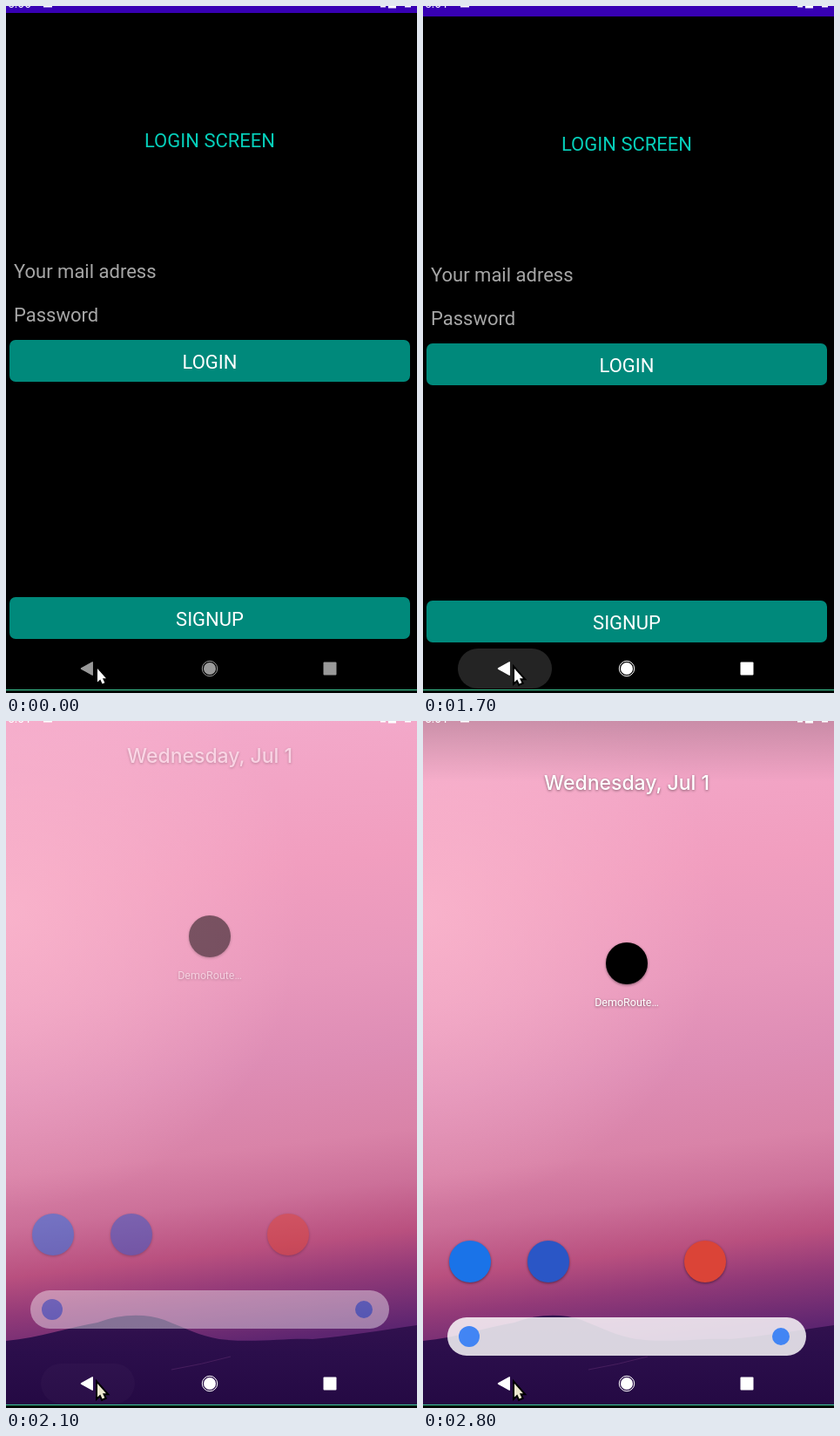
An HTML page that plays this animation: 472x788 px, repeating every 2900 ms.

```html
<!DOCTYPE html>
<html lang="en">
<head>
<meta charset="utf-8">
<title>Closing a login screen</title>
<style>
  html, body { margin: 0; width: 100%; height: 100%; overflow: hidden; background: #000; }
  svg { display: block; width: 472px; height: 788px; }
  text { font-family: Roboto, sans-serif; font-size: 22px; }
  .mid { text-anchor: middle; }
  .date { font: 500 23px Inter, sans-serif; }
  .label { font-size: 12.5px; }
  .status { font-size: 14px; }
  .shadow { filter: drop-shadow(0 1px 1.5px rgba(0, 0, 0, .45)); }
</style>
</head>
<body>
<svg viewBox="0 0 472 788">
  <defs>
    <linearGradient id="sky" gradientUnits="userSpaceOnUse" x1="190" y1="0" x2="275" y2="715">
      <stop offset="0" stop-color="#f3aacb"/>
      <stop offset=".25" stop-color="#f19ebf"/>
      <stop offset=".42" stop-color="#e898bc"/>
      <stop offset=".56" stop-color="#de8db5"/>
      <stop offset=".69" stop-color="#d983a8"/>
      <stop offset=".77" stop-color="#cc7099"/>
      <stop offset=".85" stop-color="#b9507f"/>
      <stop offset=".91" stop-color="#933a78"/>
      <stop offset="1" stop-color="#5d2570"/>
    </linearGradient>
    <radialGradient id="glow" gradientUnits="userSpaceOnUse" cx="0" cy="220" r="340">
      <stop offset="0" stop-color="#fab6cd" stop-opacity=".85"/>
      <stop offset="1" stop-color="#fab6cd" stop-opacity="0"/>
    </radialGradient>
    <linearGradient id="ground" x1="0" y1="0" x2="0" y2="1">
      <stop offset="0" stop-color="#33124f"/>
      <stop offset=".4" stop-color="#2b0e4b"/>
      <stop offset="1" stop-color="#240943"/>
    </linearGradient>
    <linearGradient id="shade" x1="0" y1="0" x2="0" y2="1">
      <stop offset="0" stop-opacity=".17"/>
      <stop offset="1" stop-opacity="0"/>
    </linearGradient>
  </defs>

  <g id="wallpaper">
    <rect width="472" height="788" fill="url(#sky)"/>
    <rect width="472" height="788" fill="url(#glow)"/>
    <path fill="url(#ground)" d="M0 711C40 707 70 696 105 690C130 680 160 679 182 687C207 697 222 705 245 709C285 714 325 707 352 709C395 705 430 699 472 693V788H0Z"/>
    <path d="M190 744Q225 738 258 729" fill="none" stroke="#5a2a6c" stroke-width="1" opacity=".6"/>
  </g>

  <g id="home">
    <rect id="topShade" width="472" height="70" fill="url(#shade)"/>
    <g id="homeItems">
      <text class="date mid shadow" x="234" y="79" fill="#fff">Wednesday, Jul 1</text>
      <g class="shadow">
        <circle cx="234" cy="278" r="24"/>
        <circle cx="54" cy="620" r="24" fill="#1a73e8"/>
        <circle cx="144" cy="620" r="24" fill="#2a56c6"/>
        <circle cx="324" cy="620" r="24" fill="#db4437"/>
      </g>
      <text class="label mid shadow" x="234" y="327" fill="#fff">DemoRoute…</text>
      <rect x="28" y="684" width="412" height="44" rx="22" fill="#fff" fill-opacity=".82"/>
      <circle cx="53" cy="706" r="12" fill="#4285f4"/>
      <circle cx="411" cy="706" r="10" fill="#4285f4"/>
    </g>
  </g>

  <g id="app">
    <rect y="-16" width="472" height="820"/>
    <rect y="-16" width="472" height="24" fill="#3700b3"/>
    <text class="mid" x="234" y="162" fill="#06cfba">LOGIN SCREEN</text>
    <g fill="#a6a6a6">
      <text x="9" y="312">Your mail adress</text>
      <text x="9" y="362">Password</text>
    </g>
    <g fill="#00897b">
      <rect x="4" y="383" width="460" height="48" rx="7"/>
      <rect x="4" y="678" width="460" height="48" rx="7"/>
    </g>
    <g class="mid" fill="#fff">
      <text x="234" y="416">LOGIN</text>
      <text x="234" y="711">SIGNUP</text>
    </g>
  </g>

  <g fill="#fff">
    <text id="clock" class="status" x="2" y="2">5:00</text>
    <path d="M43 0h10v1.5h-10zM430 0h6v1.5h-6zM439 0h9v2.5h-9zM458 0h7v1.5h-7z"/>
  </g>

  <rect id="ripple" x="40" y="737" width="108" height="46" rx="23" fill="#fff"/>
  <g id="nav">
    <path d="M86.5 760L99.2 752.8V767.2Z" stroke-width="1.5" stroke-linejoin="round"/>
    <circle cx="234" cy="760" r="7" stroke="none"/>
    <circle cx="234" cy="760" r="8.7" fill="none" stroke-width="1"/>
    <rect x="364.5" y="752.5" width="15" height="15" rx="1" stroke="none"/>
  </g>

  <rect y="785" width="472" height="3"/>
  <rect y="784" width="472" height="1" fill="#3fd39c"/>
  <path id="cursor" d="M105 760V775.5L108.3 772.5L110.6 777.5L113.4 776.2L111 771.3H115Z" stroke="#000" stroke-width="4" paint-order="stroke"/>
</svg>

<script>
  const LOOP = 2900, STEP = 100;
  const el = id => document.getElementById(id);
  const set = (id, attrs) => {
    for (const name in attrs) el(id).setAttribute(name, attrs[name]);
  };

  // Each track is a list of [time, value] points joined by straight lines.
  const tracks = {
    appY: [[1600, 0], [1700, 4], [1800, 103], [1900, 150]],
    appAlpha: [[1700, 1], [1800, .26], [1900, 0]],
    homeY: [[1800, -39.5], [2100, -31], [2200, -21], [2300, -9], [2400, -2], [2500, 0]],
    homeAlpha: [[1800, .34], [2100, .5], [2200, .67], [2300, .86], [2400, 1]],
    shadeAlpha: [[2500, 0], [2800, 1]],
    navLight: [[1100, 153], [1500, 255]],
    rippleAlpha: [[1200, 0], [1400, .14], [1700, .14], [1800, .035], [2100, .025], [2400, 0]],
    rippleSize: [[1200, .5], [1500, 1]]
  };

  function at(track, t) {
    const points = tracks[track];
    const next = points.findIndex(p => p[0] > t);
    if (next === 0) return points[0][1];
    if (next < 0) return points[points.length - 1][1];
    const [t0, v0] = points[next - 1], [t1, v1] = points[next];
    return v0 + (v1 - v0) * (t - t0) / (t1 - t0);
  }

  function draw(t) {
    set('app', { transform: `translate(0 ${at('appY', t)})`, opacity: at('appAlpha', t) });
    set('homeItems', { transform: `translate(0 ${at('homeY', t)})`, opacity: at('homeAlpha', t) });
    set('topShade', { opacity: at('shadeAlpha', t) });

    const light = Math.round(at('navLight', t));
    const shade = `rgb(${light},${light},${light})`;
    set('nav', { fill: shade, stroke: shade });

    const size = at('rippleSize', t);
    set('ripple', {
      opacity: at('rippleAlpha', t),
      transform: `translate(94 760) scale(${size}) translate(-94 -760)`
    });
    set('cursor', { fill: t < 1800 ? '#fff' : '#ece7cd' });
    el('clock').textContent = t < 1200 ? '5:00' : '5:01';
  }

  const start = performance.now();
  function tick() {
    const t = (performance.now() - start) % LOOP;
    draw(Math.floor(t / STEP) * STEP);
    requestAnimationFrame(tick);
  }
  tick();
</script>
</body>
</html>
```
